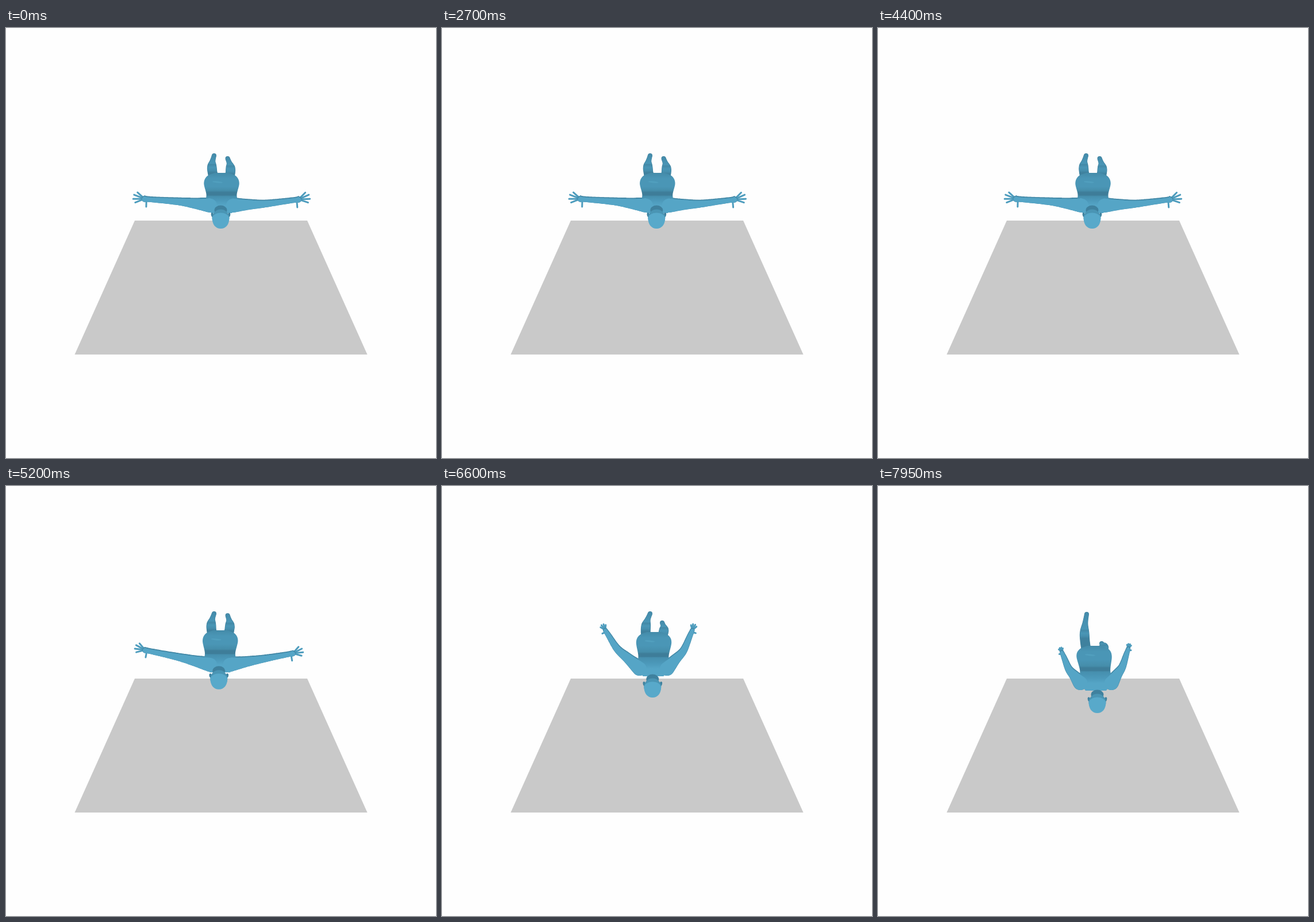
Write an HTML page with a canvas that moves like this. It is 748 by 748 pixels and loops after 8 s.

```html
<!DOCTYPE html>
<html lang="en">
<head>
<meta charset="utf-8">
<title>Figure above a floor</title>
<style>
  html, body { margin: 0; width: 100%; height: 100%; overflow: hidden; background: #fefefe; }
  canvas { display: block; width: 100vw; height: 100vh; }
</style>
</head>
<body>
<canvas id="stage" width="748" height="748"></canvas>
<script>
const ctx = document.getElementById('stage').getContext('2d');
const LOOP = 8000, STEP = 50;
const DARK = '#3f819e', MID = '#4a96b6', LIGHT = '#55a5c6';

// Joints of the rig; everything else is derived from them.
// span: half the shoulder width, reach: foreshortening of the fingers.
const spread = {
  head: [373.5, 332.5], chest: [375, 306], hip: [375, 270], span: [20], reach: [1],
  leftElbow: [300, 301.5], leftWrist: [252, 298], leftFoot: [362, 222],
  rightElbow: [450, 305.5], rightWrist: [498, 299.5], rightFoot: [385.5, 227]
};
const lowering = {
  head: [368, 343.5], chest: [370, 311], hip: [371, 269], span: [17], reach: [0.77],
  leftElbow: [299, 291], leftWrist: [262, 275], leftFoot: [362, 222],
  rightElbow: [441, 294], rightWrist: [470, 282], rightFoot: [385, 227]
};
const folding = {
  head: [366.3, 351.5], chest: [367.5, 315], hip: [368.5, 272], span: [24], reach: [0.55],
  leftElbow: [305, 283], leftWrist: [290, 260], leftFoot: [362, 222],
  rightElbow: [420, 286], rightWrist: [431, 261], rightFoot: [383, 238]
};
const crouching = {
  head: [381.5, 378.5], chest: [379, 340], hip: [376, 296], span: [27], reach: [0.4],
  leftElbow: [332, 318], leftWrist: [324, 299], leftFoot: [363, 223],
  rightElbow: [425, 314], rightWrist: [432, 293], rightFoot: [389, 274]
};
const drifted = Object.fromEntries(Object.entries(spread).map(([name, [x, y]]) =>
  [name, y === undefined || name.endsWith('Foot') ? [x, y] : [x - 1, y]]));

const KEYS = [spread, drifted, lowering, folding, crouching];
const TIMES = [2000, 4400, 5800, 6600, 7950];

// Hermite curve through the keys: at rest first, extrapolated at the end.
function valueAt(values, time) {
  if (time <= TIMES[0]) return values[0];
  const length = i => TIMES[i + 1] - TIMES[i];
  const slope = i => (values[i + 1] - values[i]) / length(i);
  const tangent = i => {
    if (i < 2) return 0;
    if (i === 4) return 2 * slope(3) - tangent(3);
    return (slope(i - 1) * length(i) + slope(i) * length(i - 1)) / (length(i) + length(i - 1));
  };
  let i = 0;
  while (i < 3 && time > TIMES[i + 1]) i++;
  const h = length(i), u = (time - TIMES[i]) / h, v = 1 - u;
  return values[i] * v * v * (1 + 2 * u) + values[i + 1] * u * u * (3 - 2 * u)
    + h * u * v * (tangent(i) * v - tangent(i + 1) * u);
}

const poseAt = time => Object.fromEntries(Object.keys(spread).map(name =>
  [name, spread[name].map((_, axis) => valueAt(KEYS.map(key => key[name][axis]), time))]));

const mix = (a, b, u) => a.map((value, i) => value + (b[i] - value) * u);

// Catmull-Rom samples through points of [x, y, size].
function smooth(points, samples = 30) {
  const result = [];
  for (let i = 0; i < points.length - 1; i++) {
    const b = points[i], c = points[i + 1];
    const a = points[i - 1] || b, d = points[i + 2] || c;
    for (let s = 0; s <= samples; s++) {
      const u = s / samples;
      result.push(b.map((_, j) => b[j] + u / 2 * (c[j] - a[j]
        + u * (2 * a[j] - 5 * b[j] + 4 * c[j] - d[j]
        + u * (3 * (b[j] - c[j]) + d[j] - a[j])))));
    }
  }
  return result;
}

function limb(points, color, inset = 0, dy = 0) {
  ctx.fillStyle = color;
  ctx.beginPath();
  for (const [x, y, r] of smooth(points)) {
    ctx.moveTo(x + r - inset, y + dy);
    ctx.arc(x, y + dy, r - inset, 0, 7);
  }
  ctx.fill();
}

function ellipse(x, y, rx, ry, color, tilt = 0) {
  ctx.fillStyle = color;
  ctx.beginPath();
  ctx.ellipse(x, y, rx, ry, tilt, 0, 7);
  ctx.fill();
}

function verticalGradient(top, bottom, stops) {
  const gradient = ctx.createLinearGradient(0, top, 0, bottom);
  for (const [y, color] of stops) {
    gradient.addColorStop(Math.min(1, Math.max(0, (y - top) / (bottom - top))), color);
  }
  return gradient;
}

function drawLeg(foot, hip, side) {
  const base = [hip[0] + side * 13.5, hip[1] - 9];
  const points = [4, 5, 8.2, 8.5, 8.5].map((size, i) => {
    const [x, y] = mix(foot, base, i / 4);
    return [x + side * 3.5 * Math.sin(i / 4 * Math.PI), y, size];
  });
  const top = foot[1], knee = points[2][1], bottom = base[1];
  limb(points, DARK);
  limb(points, verticalGradient(top, bottom, [
    [top, '#458dac'], [knee - 6, MID], [knee - 4, '#4389a7'],
    [knee + 1, MID], [knee + 6, '#468fae'], [knee + 10, DARK]
  ]), 0.6, 0.3);
}

function armPoints(shoulder, elbow, wrist, reach) {
  const angle = Math.atan2(wrist[1] - elbow[1], wrist[0] - elbow[0]);
  const palm = [wrist[0] + 11 * Math.cos(angle), wrist[1] + 11 * Math.sin(angle)];
  return [
    [...palm, 2.5 + 3 * reach], [...wrist, 5], [...elbow, 6.8],
    [...mix(elbow, shoulder, 0.5), 9.3], [...shoulder, 13]
  ];
}

function drawFingers([palm, wrist], side, reach) {
  const angle = Math.atan2(palm[1] - wrist[1], palm[0] - wrist[0]);
  const finger = (turn, length, [x, y]) => {
    const a = angle + side * turn;
    ctx.beginPath();
    ctx.moveTo(x, y);
    ctx.lineTo(palm[0] + length * reach * Math.cos(a), palm[1] + length * reach * Math.sin(a));
    ctx.stroke();
  };
  ctx.strokeStyle = '#4d9cbd';
  ctx.lineWidth = 3;
  ctx.lineCap = 'round';
  for (let i = 0; i < 4; i++) finger((i - 1.8) * 0.37, 20 - 1.3 * (i - 1.6) ** 2, palm);
  finger(1.85, 14, mix(palm, wrist, 0.3));
}

function drawTorso([hipX, hipY], [chestX, chestY]) {
  const hip = [hipX, hipY], chest = [chestX, chestY];
  const waist = mix(hip, chest, 0.55);
  const top = hipY - 18, bottom = chestY + 16;
  const edge = smooth([
    [hipX, top, 12], [hipX, hipY - 12, 25.5], [...hip, 30.7],
    [...waist, 26.5], [...chest, 28], [chestX, bottom, 18]
  ]);
  ctx.fillStyle = verticalGradient(top, bottom, [
    [top, '#448ba9'], [hipY - 8, MID], [hipY + 6, MID], [waist[1] - 7, '#458daa'],
    [waist[1] - 4, '#3e7d99'], [waist[1] + 1, '#3e7d99'], [waist[1] + 3, '#468fae'],
    [chestY - 6, '#4c99ba'], [chestY + 3, LIGHT], [bottom, LIGHT]
  ]);
  ctx.beginPath();
  for (const [x, y, w] of edge) ctx.lineTo(x - w, y);
  for (const [x, y, w] of edge.reverse()) ctx.lineTo(x + w, y);
  ctx.fill();
  ellipse(hipX - 7, hipY - 2, 9, 1.6, '#519fbe', 0.08);
}

function drawHead([x, y]) {
  ellipse(x, y - 15.5, 11, 8.5, DARK);
  for (const side of [-1, 1]) ellipse(x + side * 14.5, y - 7.5, 2.2, 3.8, DARK, side * 0.2);
  ellipse(x, y - 2, 15, 15, '#4a95b4');
  ctx.fillStyle = '#58a9ca';
  ctx.beginPath();
  ctx.moveTo(x - 14.8, y - 2);
  ctx.bezierCurveTo(x - 12, y - 14, x + 12, y - 14, x + 14.8, y - 2);
  ctx.bezierCurveTo(x + 15, y + 9, x + 9, y + 16.5, x, y + 16.5);
  ctx.bezierCurveTo(x - 9, y + 16.5, x - 15, y + 9, x - 14.8, y - 2);
  ctx.fill();
}

function drawFloor() {
  ctx.fillStyle = '#c9c9c9';
  ctx.beginPath();
  ctx.moveTo(224, 335);
  ctx.lineTo(524, 335);
  ctx.lineTo(628.5, 568);
  ctx.lineTo(119.5, 568);
  ctx.fill();
}

function draw(time) {
  const pose = poseAt(time);
  const { head, chest, hip, span: [span], reach: [reach] } = pose;
  ctx.fillStyle = '#fefefe';
  ctx.fillRect(0, 0, 748, 748);
  drawFloor();

  const sides = [['left', -1], ['right', 1]];
  const arms = sides.map(([name, side]) => armPoints(
    [chest[0] + side * span, chest[1] + 2], pose[name + 'Elbow'], pose[name + 'Wrist'], reach));
  sides.forEach(([name, side], i) => {
    drawLeg(pose[name + 'Foot'], hip, side);
    drawFingers(arms[i], side, reach);
    limb(arms[i], '#4388a6');
  });
  drawTorso(hip, chest);
  arms.forEach(arm => limb(arm, LIGHT, 0.9, 0.9));
  drawHead(head);
}

function frame() {
  const time = performance.now() % LOOP;
  draw(Math.floor(time / STEP) * STEP);
  requestAnimationFrame(frame);
}
frame();
</script>
</body>
</html>
```
